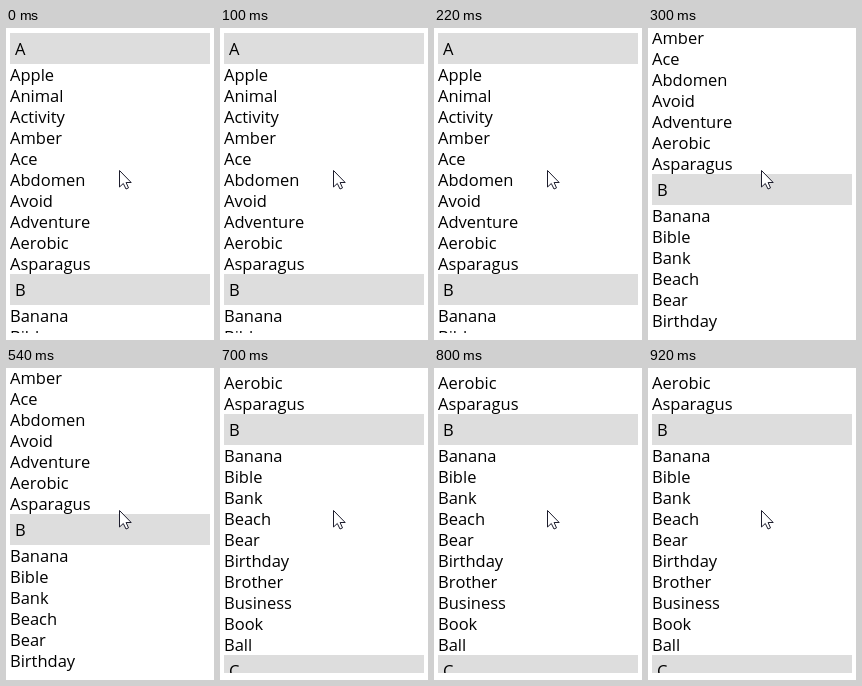
Write an HTML page that moves like this. It is 208x312 px and loops after 1 s.

```html
<!DOCTYPE html>
<html lang="en">
<head>
<meta charset="utf-8">
<title>Scrolling word list</title>
<style>
  html, body { margin: 0; width: 100%; height: 100%; overflow: hidden; background: #fff; }
  svg { display: block; }
  text { font: 16.5px "Open Sans", "Noto Sans", sans-serif; font-kerning: none; fill: #000; }
</style>
</head>
<body>
<svg width="208" height="312" viewBox="0 0 208 312">
  <clipPath id="view"><rect x="4" y="5" width="200" height="300"/></clipPath>
  <g clip-path="url(#view)"><g id="list"></g></g>
  <path transform="translate(113.5 142.5)" d="M0 0V16.5L3.8 13L6.5 18.5L9 17.4L6.6 12H11.7Z"
        fill="#fff" stroke="#1c1c2c" stroke-linejoin="round"/>
</svg>
<script>
const ROW = 21, PAD = 5, BASE = 17, LEFT = 4, TOP = 5;
const groups = {
  A: 'Apple Animal Activity Amber Ace Abdomen Avoid Adventure Aerobic Asparagus',
  B: 'Banana Bible Bank Beach Bear Birthday Brother Business Book Ball',
  C: ''
};
const list = document.getElementById('list');

function add(tag, attrs, text = '') {
  const el = document.createElementNS('http://www.w3.org/2000/svg', tag);
  for (const key in attrs) el.setAttribute(key, attrs[key]);
  el.textContent = text;
  list.append(el);
}

let y = TOP;
for (const letter in groups) {
  const height = ROW + 2 * PAD;
  add('rect', { x: LEFT, y, width: 200, height, fill: '#ddd' });
  add('text', { x: LEFT + PAD, y: y + PAD + BASE }, letter);
  y += height;
  for (const word of groups[letter].split(' ').filter(Boolean)) {
    add('text', { x: LEFT, y: y + BASE }, word);
    y += ROW;
  }
}

// [start in ms, scroll offset in px]
const LOOP = 1000;
const stops = [[0, 0], [300, 100], [700, 200], [LOOP, 200]];
list.animate(
  stops.map(([ms, scroll]) => ({
    offset: ms / LOOP,
    transform: `translateY(${-scroll}px)`,
    easing: 'steps(1, end)'
  })),
  { duration: LOOP, iterations: Infinity }
);
</script>
</body>
</html>
```
